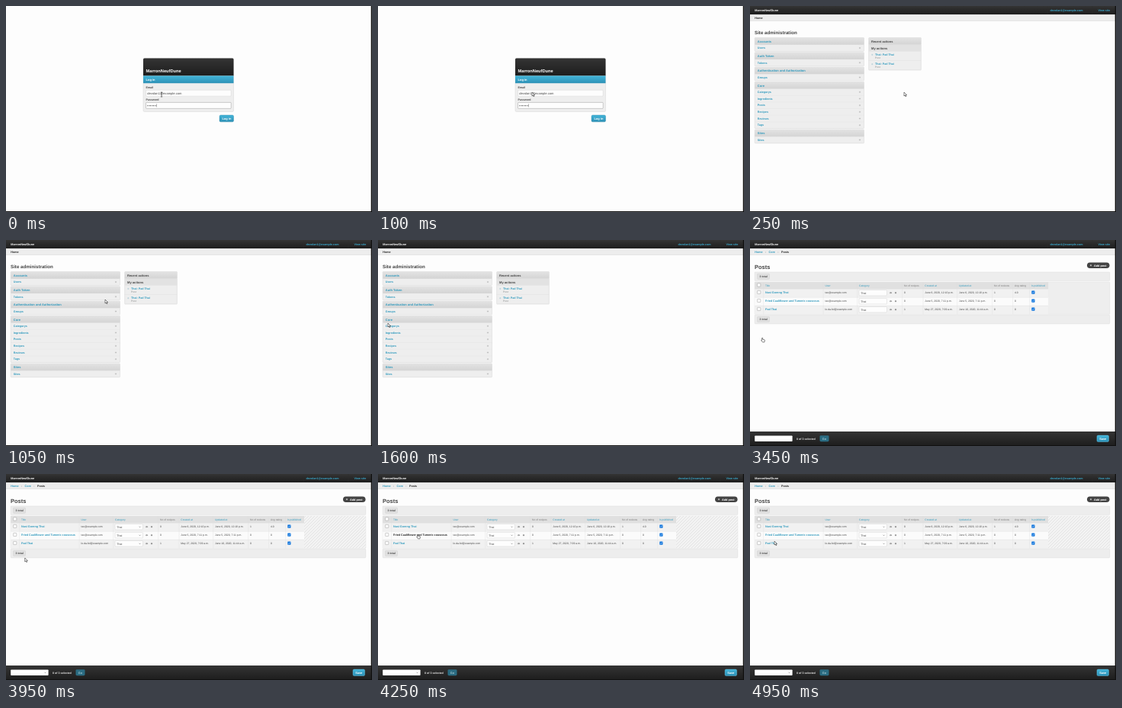
These frames come from a looping animation (480x270 px, 5000 ms). An HTML page:

```html
<!DOCTYPE html>
<html lang="en">
<head>
<meta charset="utf-8">
<title>Recipe admin</title>
<style>
  html, body { margin: 0; width: 100%; height: 100%; overflow: hidden; background: #fdfdfd; }
  svg { display: block; width: 100vw; height: 100vh; font-family: "Liberation Sans", Arial, sans-serif; }
  text { white-space: pre; }
</style>
</head>
<body>
<svg id="stage" viewBox="0 0 480 270" text-rendering="geometricPrecision"></svg>
<script>
const LOOP = 5000, STEP = 50;
const LINK = '#2e99bd', INK = '#444', HOVER = '#222', MAIL = 'devolan1@example.com', SITE = 'MarronNeufDune';

const rect = (x, y, w, h, fill, more = '') =>
  `<rect x="${x}" y="${y}" width="${w}" height="${h}" fill="${fill}" ${more}/>`;

// Text is centred vertically on y.
const text = (x, y, s, size = 3.4, fill = INK, bold = false, more = '') =>
  `<text x="${x}" y="${(y + size * .36).toFixed(2)}" font-size="${size}" fill="${fill}"` +
  `${bold ? ' font-weight="700"' : ''} ${more}>${s}</text>`;

const link = (x, y, s, size = 3.7) =>
  text(x, y, s, size, LINK, true, `class="link" data-x="${x}" data-y="${y}" data-w="${s.length * size * .52}"`);

const line = (x1, y1, x2, y2, color, width = .35) =>
  `<path d="M${x1} ${y1}L${x2} ${y2}" stroke="${color}" stroke-width="${width}"/>`;

const gradient = (id, from, to) =>
  `<linearGradient id="${id}" x2="0" y2="1"><stop stop-color="${from}"/><stop offset="1" stop-color="${to}"/></linearGradient>`;

const border = (color, r = .8) => `stroke="${color}" stroke-width=".4" rx="${r}"`;

const plus = (x, y, color) =>
  `<path d="M${x - 1.1} ${y}h2.2M${x} ${y - 1.1}v2.2" stroke="${color}" stroke-width=".6"/>`;

const defs = `<defs>
  ${gradient('dark', '#343434', '#1d1d1d')}
  ${gradient('blue', '#43b5d9', '#2d91b6')}
  ${gradient('head', '#e3e3e3', '#d4d4d4')}
  <pattern id="hatch" width="4" height="4" patternUnits="userSpaceOnUse">
    <rect width="4" height="4" fill="#f3f3f3"/>
    <path d="M-1 1L1 -1M0 4L4 0M3 5L5 3" stroke="#dcdcdc" stroke-width=".7"/>
  </pattern></defs>`;

function login() {
  const field = (y, label, stroke) =>
    text(183.5, y - 7.5, label, 3.6, INK, true) + rect(183.5, y - 4, 111.7, 8, '#fdfdfd', border(stroke));
  return rect(180, 68.5, 118.5, 70, '#eee', border('#d0d0d0', 1.5)) +
    `<path d="M180 91.5V70q0-1.5 1.5-1.5h115.500q1.5 0 1.5 1.5v21.500z" fill="url(#dark)"/>` +
    text(183.5, 84.7, SITE, 5.7, '#fff', true) +
    rect(180, 91.5, 118.5, 9.7, 'url(#blue)') + text(183.5, 96.5, 'Log in', 4, '#fff', true) +
    field(114.2, 'Email', '#ccc') + text(185.3, 114.2, MAIL, 4.1, INK) +
    field(130.4, 'Password', '#888') + text(185, 130.4, '•••••••••', 3.8, INK) +
    line(197.4, 128.4, 197.4, 132.4, '#222') +
    rect(280, 143, 18.5, 8.8, 'url(#blue)', border('#2a86a8', 1.6)) +
    text(283.4, 147.4, 'Log in', 4, '#fff', true);
}

const topBar = () =>
  rect(0, 0, 480, 11.3, 'url(#dark)') + rect(0, 11.3, 480, 8, '#ededed') + line(0, 19.4, 480, 19.4, '#ccc', .5) +
  text(6.3, 5.7, SITE, 3.8, '#fff', true) +
  text(393.5, 5.7, MAIL, 3.7, '#3aa9cd', true) +
  text(456.5, 5.7, 'View site', 3.7, '#3aa9cd', true) +
  line(390, 0, 390, 11, '#333') + line(449, 0, 449, 11, '#333');

function dashboard() {
  const modules = [
    ['Accounts', 'Users'], ['Auth Token', 'Tokens'], ['Authentication and Authorization', 'Groups'],
    ['Core', 'Categorys', 'Ingredients', 'Posts', 'Recipes', 'Reviews', 'Tags'], ['Sites', 'Sites']];
  let y = 46.3, out = topBar() + text(6.3, 15.4, 'Home', 3.7, HOVER, true) +
    text(6, 35, 'Site administration', 6.2, INK, true);
  for (const [title, ...items] of modules) {
    const height = 9.3 + items.length * 8.67;
    out += rect(6.2, y - 4.8, 143.3, height, '#eee', border('#d0d0d0')) +
      rect(6.2, y - 4.8, 143.3, 9.3, 'url(#head)', 'rx=".8"') + text(9.8, y, title, 4, LINK, true);
    items.forEach((item, i) => {
      const row = y + 8.7 + i * 8.67;
      if (i) out += line(6.2, row - 4.3, 149.5, row - 4.3, '#e0e0e0');
      out += link(9.8, +row.toFixed(2), item) + plus(144, row, '#b0b0b0');
    });
    y += height + 1.3;
  }
  out += rect(155.7, 41.5, 68.7, 42.5, '#eee', border('#d0d0d0')) +
    rect(155.7, 41.5, 68.7, 9.3, 'url(#head)', 'rx=".8"') + text(159, 46.3, 'Recent actions', 4, INK, true) +
    rect(155.7, 50.8, 68.7, 8.7, '#e2e2e2') + text(159, 55.1, 'My actions', 4.1, INK, true);
  for (const row of [63.5, 75.8])
    out += plus(160.3, row + .4, '#a9c8d3') + text(164, row, 'Thai: Pad Thai', 3.65, LINK, true) +
      text(164, row + 4, 'Post', 3.3, '#888') + line(155.7, row + 8, 224.4, row + 8, '#ddd');
  return out;
}

function posts() {
  const columns = [
    [20, 'Title', 1], [98.5, 'User', 1], [143, 'Category', 1], [202, 'No of recipes'], [229.3, 'Created at', 1],
    [274, 'Updated at', 1], [320, 'No of reviews'], [347, 'Avg rating'], [369, 'Is published', 1]];
  const rows = [
    ['Nasi Goreng Thai', 'tav@example.com', 0, 'June 6, 2020, 12:10 p.m.', 'June 6, 2020, 12:10 p.m.', 1, '4.0'],
    ['Fried Cauliflower and Tumeric couscous', 'tav@example.com', 0, 'June 5, 2020, 7:11 p.m.', 'June 5, 2020, 7:11 p.m.', 0, 0],
    ['Pad Thai', 'lo.da-fel@example.com', 1, 'May 27, 2020, 7:09 a.m.', 'June 10, 2020, 11:44 a.m.', 0, 0]];
  const box = y => rect(9.6, y - 2.1, 4.2, 4.2, '#fff', border('#888', .6));
  const total = y => rect(6.2, y - 5.8, 465.6, 11.6, '#ededed', border('#d6d6d6')) +
    rect(9.5, y - 3.6, 16, 7.2, '#e0e0e0', border('#ccc')) + text(12.5, y, '3 total', 3.5, INK, true);
  const caret = (x, y) => `<path d="M${x - 1} ${y - .5}l1 1l1-1" fill="none" stroke="#555" stroke-width=".5"/>`;

  let out = topBar() + text(6.3, 15.4, 'Home', 3.7, LINK, true) + text(19.8, 15.4, '›', 3.7, '#888') +
    text(24.5, 15.4, 'Core', 3.7, LINK, true) + text(36.3, 15.4, '›', 3.7, '#888') +
    text(41, 15.4, 'Posts', 3.7, HOVER, true) + text(6, 35, 'Posts', 7.5, INK, true) +
    rect(442, 29.4, 29.5, 7.7, '#444', 'rx="3.8"') + plus(447, 33.2, '#fff') +
    text(451, 33.2, 'Add post', 3.8, '#fff', true) + total(47.8) + total(104) +
    rect(6.2, 55, 465.6, 42.3, '#eee', border('#d6d6d6')) + rect(6.2, 55, 385, 9.2, '#e0e0e0') + box(59);
  let late = rect(391, 55, 80.6, 42.3, 'url(#hatch)');

  for (const [x, label, sortable] of columns) out += text(x, 59.5, label, 3.35, sortable ? LINK : '#777');
  rows.forEach(([title, user, recipes, created, updated, reviews, rating], i) => {
    const y = 69 + i * 11;
    out += rect(6.2, y - 4.8, 385, 11, i % 2 ? '#fbfbfb' : '#f1f1f1') + line(6.2, y - 4.8, 391, y - 4.8, '#d8d8d8') +
      box(y - .5) + link(20, y, title) + rect(143, y - 3.5, 36.5, 7.4, '#fdfdfd', border('#ccc')) +
      text(145.2, y + .3, 'Thai', 3.6) + plus(191, y + .2, '#555') +
      `<path d="M182.900 ${y + .2}h2.600m-1-1l1 1l-1 1" fill="none" stroke="#555" stroke-width=".6"/>` +
      rect(369.3, y - 2.5, 4.2, 4.2, '#0b72dc', 'rx=".6"') +
      `<path d="M370.200 ${y - .4}l.9.9l1.600-1.900" fill="none" stroke="#fff" stroke-width=".6"/>`;
    const cells = [user, null, recipes, created, updated, reviews, rating];
    cells.forEach((cell, c) => { if (cell !== null) out += text(columns[c + 1][0], y, cell); });
    late += caret(175.5, y + .3);
  });
  for (const [x] of columns) out += line(x - 2.3, 55, x - 2.3, 97.3, '#dcdcdc');
  late += caret(51.5, 260.2);

  out += rect(0, 251, 480, 19, 'url(#dark)') + rect(6.2, 256.4, 49.4, 7.6, '#fdfdfd', 'rx=".8"') +
    text(61, 260.2, '0 of 3 selected', 3.6, '#eee', true) +
    rect(91.5, 256.2, 12, 8, '#2b6c82', 'rx="1.4"') + text(94.8, 260.2, 'Go', 3.8, '#a5c6d1', true) +
    rect(455, 256, 15.5, 8.4, 'url(#blue)', border('#6fd0ee', 1.5)) + text(458.2, 260.2, 'Save', 3.9, '#fff', true);
  return out + `<g id="late">${late}</g>`;
}

const cursors = {
  beam: 'M.8 0h2.400M.8 6h2.400M2 0v6',
  arrow: 'M0 0V5L1.200 3.900L2 5.700L2.900 5.300L2.100 3.600H3.600Z',
  hand: 'M.6 .5q.6-.7 1.100 0v1.700l2.300.6q.5.2.4.8l-.5 2.300h-2.400l-1.800-2.400q.3-.7.9-.1z'
};

const stage = document.getElementById('stage');
stage.innerHTML = defs + rect(0, 0, 480, 270, '#fdfdfd') +
  `<g class="page">${login()}</g><g class="page">${dashboard()}</g><g class="page">${posts()}</g>` +
  rect(478.7, 0, 1.3, 270, '#111') + rect(0, 269, 480, 1, '#111') +
  `<path id="cursor" fill="#fff" stroke="#222" stroke-width=".55" stroke-linejoin="round"/>`;

const pages = [...stage.querySelectorAll('.page')];
const links = pages.map(page => [...page.querySelectorAll('.link')]);
const late = document.getElementById('late');
const cursor = document.getElementById('cursor');

// Cursor tip as [time, x, y].
const route = [
  [0, 202, 113], [850, 202, 113], [1050, 130, 78], [1200, 50, 61], [1300, 9, 72], [1400, 11, 93],
  [1600, 13, 109], [1950, 14, 121], [2300, 15, 128], [3800, 15, 128], [4000, 28, 104],
  [4250, 51, 79], [4400, 51, 79], [4850, 33, 83], [4900, 32, 84], [4950, 32, 88], [LOOP, 32, 88]];

function tipAt(t) {
  const i = route.findIndex(point => point[0] > t);
  const [t0, x0, y0] = route[i - 1], [t1, x1, y1] = route[i];
  const k = (t - t0) / (t1 - t0);
  return [x0 + (x1 - x0) * k, y0 + (y1 - y0) * k];
}

function render(time) {
  const t = Math.floor(time % LOOP / STEP) * STEP;
  const current = t < 250 ? 0 : t < 3450 ? 1 : 2;
  const [x, y] = tipAt(t);
  let shape = t < 100 ? 'beam' : 'arrow';
  pages.forEach((page, i) => page.setAttribute('display', i === current ? 'inline' : 'none'));
  late.setAttribute('display', t < 3500 ? 'none' : 'inline');
  for (const item of links[current]) {
    const { x: left, y: middle, w } = item.dataset;
    const over = x >= +left && x <= +left + +w && Math.abs(y - middle) < 2.5;
    item.setAttribute('fill', over ? HOVER : LINK);
    if (over) shape = 'hand';
  }
  if (t === 3450) shape = 'hand';
  cursor.setAttribute('d', cursors[shape]);
  cursor.setAttribute('transform', `translate(${x.toFixed(2)} ${y.toFixed(2)})`);
}

const start = performance.now();
function tick() {
  render(performance.now() - start);
  requestAnimationFrame(tick);
}
tick();
</script>
</body>
</html>
```
